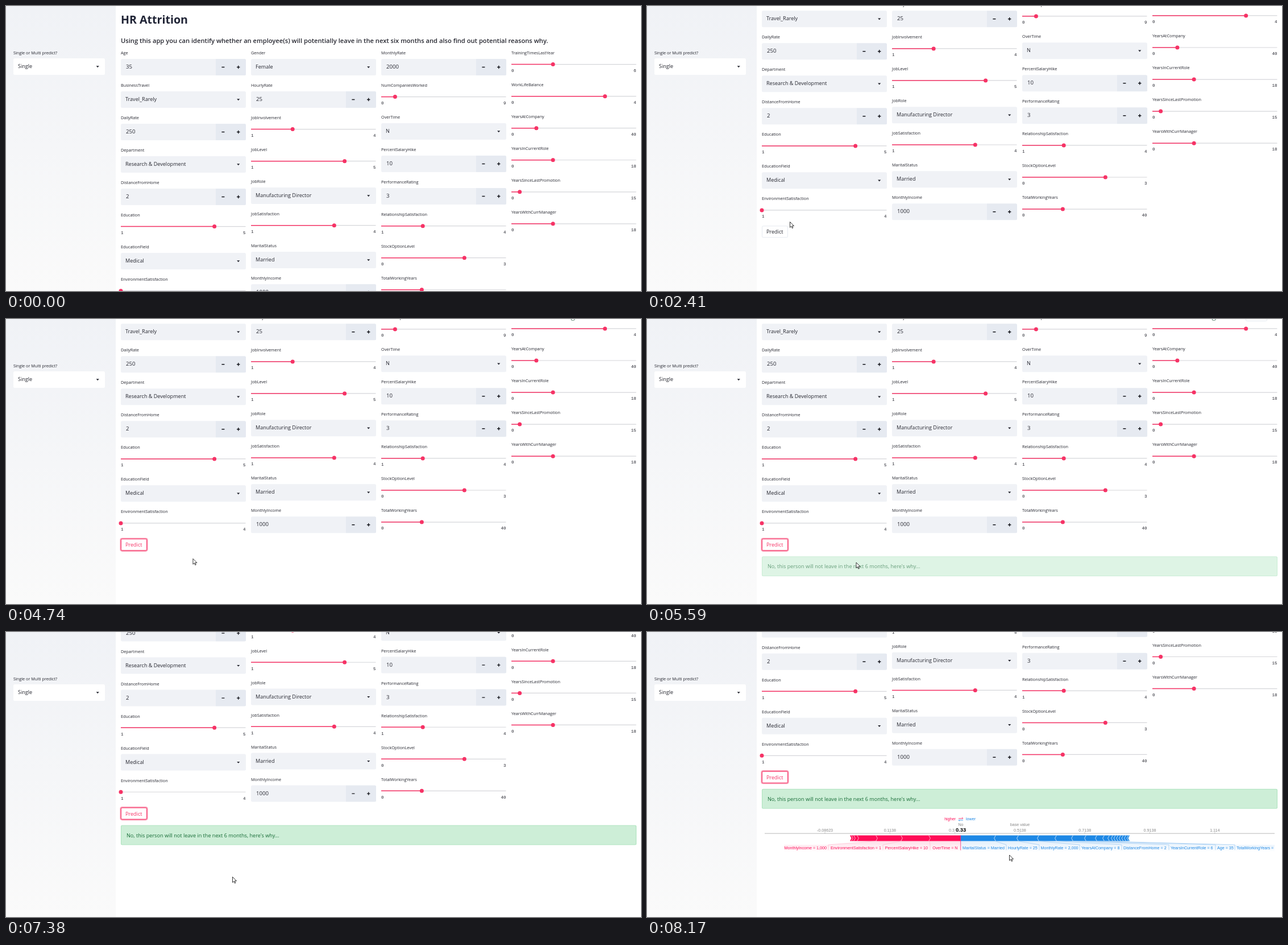
An HTML page that plays this animation: 1117x501 px, repeating every 8570 ms.

```html
<!DOCTYPE html>
<html lang="en">
<head>
<meta charset="utf-8">
<title>HR Attrition</title>
<style>
html, body { margin: 0; width: 100%; height: 100%; overflow: hidden; background: #fff; }
body { position: relative; font: 9.1px/20px "Open Sans", "Noto Sans", sans-serif; color: #262730; }
body div, body svg { position: absolute; white-space: pre; }
svg { overflow: visible; }
#page { left: 0; top: 0; width: 1117px; height: 900px; }
#side { left: 0; top: 0; width: 192.5px; height: 100%; background: linear-gradient(#f0f2f6, #fafafa); }
.title { font-size: 19.6px; font-weight: 700; color: #1f2335; }
.lead { font-size: 11.17px; font-weight: 600; }
.label { font-size: 7.27px; }
.value { font-size: 9.05px; font-weight: 500; }
.num { font-size: 9.6px; font-weight: 500; }
.mono { font: 7.5px/20px "Liberation Mono", "Noto Sans Mono", monospace; }
.box { height: 29px; border-radius: 2.5px; background: #f0f2f6; overflow: hidden; }
.steps { left: 167px; top: 0; width: 53px; height: 29px; background: #e6eaf1; }
#predict { left: 202px; top: 527.5px; width: 45.5px; height: 21.5px; box-sizing: border-box;
  border: 1px solid #e6eaf1; border-radius: 2.5px; background: #fff; text-align: center; line-height: 19.5px; }
#predict.hover, #predict.focus { border-color: #f63366; color: #f63366; }
#predict.focus { box-shadow: 0 0 0 1.6px rgba(246, 51, 102, .5); }
#predict.down { border-color: #f63366; background: #f63366; color: #fff; }
#alert { left: 202px; top: 558.5px; width: 907px; height: 35px; box-sizing: border-box;
  border: 1px solid rgba(9, 171, 59, .17); border-radius: 2.5px; background: rgba(9, 171, 59, .2);
  color: #176c36; padding-left: 9px; line-height: 33px; }
#chart { left: 0; top: 600px; overflow: hidden; font: 7.15px "Liberation Sans", Arial, sans-serif; }
#run { left: 947px; top: -16px; font-size: 14px; color: #6c8f80; }
#stop { left: 1053px; top: -16px; width: 36px; height: 18px; border: 1px solid #e6eaf1; border-radius: 2.5px; }
#cursor { left: 0; top: 0; }
</style>
</head>
<body>
<div id="page">
  <div id="predict">Predict</div>
  <div id="alert">No, this person will not leave in the next 6 months, here's why...</div>
  <svg id="chart" width="1104" height="110"></svg>
</div>
<div id="run">Running...</div>
<div id="stop"></div>
<div id="side"></div>
<svg id="cursor" width="9" height="13">
  <path d="M0 0V9.8L2.3 7.7 3.9 11.2 5.4 10.5 3.8 7.1H7Z" fill="#fff" stroke="#222" stroke-width=".9"/>
</svg>
<script>
const LOOP = 8570, COL = 219.5;
const $ = id => document.getElementById(id);
const page = $('page'), side = $('side');

function add(parent, cls, style, text = '') {
  const el = document.createElement('div');
  el.className = cls;
  for (const k in style) el.style[k] = typeof style[k] === 'number' ? style[k] + 'px' : style[k];
  el.textContent = text;
  return parent.appendChild(el);
}
const write = (parent, cls, x, y, text) => add(parent, cls, { left: x, top: y - 10.4 }, text);
// One full-size layer per parent keeps thin lines at fractional positions.
function draw(parent, shape) {
  parent.insertAdjacentHTML('beforeend', `<svg style="left:0;top:0" width="1" height="1">${shape}</svg>`);
}

function box(parent, x, y, width) {
  return add(parent, 'box', { left: x, top: y - 14.5, width });
}
function select(parent, x, y, text, width = COL) {
  const b = box(parent, x, y, width);
  write(b, 'value', 8, 14.6, text);
  draw(b, `<path d="M${width - 15.4} 13.3h5.2l-2.6 2.9z" fill="#262730"/>`);
  return b;
}
function number(x, y, value) {
  const b = box(page, x, y, COL);
  write(b, 'num', 9, 14.6, value);
  add(b, 'steps', {});
  draw(b, '<path d="M177.4 14.5h5M204 14.5h5.4M206.7 11.8v5.4" stroke="#16171d" stroke-width="1.4"/>');
}
function slider(x, y, value, min, max) {
  const w = (value - min) / (max - min) * COL;
  draw(page, `<path d="M${x} ${y}h${COL}" stroke="#d5d6da" stroke-width="1.2"/>` +
    `<path d="M${x} ${y}h${w}" stroke="#f63366" stroke-width="1.5"/>` +
    `<circle cx="${x + w}" cy="${y}" r="3.5" fill="#f63366"/>`);
  write(page, 'mono', x, y + 11.9, min);
  add(page, 'mono', { right: 1117 - x - COL, top: y + 1.5 }, max);
}

// A string is a select, a number an input, an array a slider [value, min, max].
const columns = [
  [['Age', 35], ['BusinessTravel', 'Travel_Rarely'], ['DailyRate', 250],
   ['Department', 'Research & Development'], ['DistanceFromHome', 2], ['Education', [4, 1, 5]],
   ['EducationField', 'Medical'], ['EnvironmentSatisfaction', [1, 1, 4]]],
  [['Gender', 'Female'], ['HourlyRate', 25], ['JobInvolvement', [2, 1, 4]], ['JobLevel', [4, 1, 5]],
   ['JobRole', 'Manufacturing Director'], ['JobSatisfaction', [3, 1, 4]],
   ['MaritalStatus', 'Married'], ['MonthlyIncome', 1000]],
  [['MonthlyRate', 2000], ['NumCompaniesWorked', [1, 0, 9]], ['OverTime', 'N'],
   ['PercentSalaryHike', 10], ['PerformanceRating', 3], ['RelationshipSatisfaction', [2, 1, 4]],
   ['StockOptionLevel', [2, 0, 3]], ['TotalWorkingYears', [13, 0, 40]]],
  [['TrainingTimesLastYear', [2, 0, 6]], ['WorkLifeBalance', [3, 0, 4]], ['YearsAtCompany', [8, 0, 40]],
   ['YearsInCurrentRole', [6, 0, 18]], ['YearsSinceLastPromotion', [1, 0, 15]],
   ['YearsWithCurrManager', [6, 0, 18]]]
];

write(page, 'title', 202, 23.9, 'HR Attrition');
write(page, 'lead', 202, 61, 'Using this app you can identify whether an employee(s) will potentially leave ' +
  'in the next six months and also find out potential reasons why.');
columns.forEach((fields, i) => {
  const x = 202 + i * 229;
  let y = 82.3;
  for (const [name, v] of fields) {
    write(page, 'label', x, y, name);
    if (Array.isArray(v)) {
      slider(x, y + 20.3, ...v);
      y += 56.05;
    } else {
      if (typeof v === 'number') number(x, y + 24.7, v);
      else select(page, x, y + 24.7, v);
      y += 57;
    }
  }
});
write(side, 'label', 13, 82.2, 'Single or Multi predict?');
select(side, 13, 106.5, 'Single', 161).style.background = '#fff';

function drawChart() {
  const pink = '#ff0d57', blue = '#1e88e5', palePink = '#ffc3d5', paleBlue = '#a5cdf3';
  const top = 40.8, low = 50.8, mid = 45.8;
  const out = [];
  const text = (x, y, s, fill, anchor = 'middle', extra = '') =>
    out.push(`<text x="${x}" y="${y}" fill="${fill}" text-anchor="${anchor}" ${extra}>${s}</text>`);
  const path = (d, stroke, w = .8, fill = 'none') =>
    out.push(`<path d="${d}" stroke="${stroke}" stroke-width="${w}" fill="${fill}"/>`);
  const fade = (id, c) => out.push(`<linearGradient id="${id}" x2="0" y2="1"><stop stop-color="${c}" ` +
    `stop-opacity=".13"/><stop offset="1" stop-color="${c}" stop-opacity="0"/></linearGradient>`);

  fade('gp', pink);
  fade('gb', blue);
  path('M404 50.8L319 57.5H241V70H551.5V50.8Z', 'none', 0, 'url(#gp)');
  path('M551.5 50.8V70H1104V57.5H1034L790 50.8Z', 'none', 0, 'url(#gb)');

  text(543, 14.8, 'higher', pink, 'end');
  text(561, 14.8, 'lower', blue, 'start');
  path('M548 11.2H556M554 9.4L556 11.2', pink);
  path('M556 14H548M550 15.8L548 14', blue);
  text(552, 24.2, 'No', '#888');
  text(656, 24.2, 'base value', '#888');
  path('M207 37.4H1104', '#999', .7);
  ['-0.08623', '0.1138', '', '0.5138', '0.7138', '0.9138', '1.114'].forEach((s, i) => {
    const x = 313 + i * 114.3;
    path(`M${x} 35.5V37.4`, '#999', .6);
    text(x, 34.2, s, '#888');
  });
  text(541, 34.2, '0.3', '#888', 'end');
  text(552, 34.6, '0.33', '#000', 'middle', 'font-size="9.4" font-weight="700"');

  path(`M357 ${top}H551.5V${low}H357L359.5 ${mid}Z`, 'none', 0, pink);
  path(`M551.5 ${top}H849L846.5 ${mid}L849 ${low}H551.5Z`, 'none', 0, blue);
  const notch = (x, dir, c) => path(`M${x - dir} ${top}L${x + dir} ${mid}L${x - dir} ${low}`, c, .9);
  [361, 365, 371, 404, 448, 497].forEach(x => notch(x, 1.4, '#ffc3d5'));
  [612, 652, 688, 719, 748, 771, 790, 803, 812].forEach(x => notch(x, -1.4, '#d1e6fa'));
  for (let x = 818; x < 848; x += 4.6) notch(x, -1.4, '#d1e6fa');

  const leader = (from, to, c) => path(`M${from} ${low}L${to} 57.3V66.5`, c, .8);
  [[404, 319], [448, 415], [497, 498]].forEach(p => leader(...p, palePink));
  [[612, 632], [652, 690], [688, 761], [719, 835], [748, 918], [771, 1000], [790, 1034]]
    .forEach(p => leader(...p, paleBlue));
  path(`M551.7 ${top}V67`, pink, .7);

  [[316, 'MonthlyIncome = 1,000'], [412, 'EnvironmentSatisfaction = 1'],
   [494, 'PercentSalaryHike = 10'], [546.5, 'OverTime = N']].forEach(([x, s]) => text(x, 65.6, s, pink, 'end'));
  [[555, 'MaritalStatus = Married'], [635, 'HourlyRate = 25'], [692.5, 'MonthlyRate = 2,000'],
   [764, 'YearsAtCompany = 8'], [838, 'DistanceFromHome = 2'], [921, 'YearsInCurrentRole = 6'],
   [1003, 'Age = 35'], [1037, 'TotalWorkingYears = 13']].forEach(([x, s]) => text(x, 65.6, s, blue, 'start'));
  $('chart').innerHTML = out.join('');
}
drawChart();

const scroll = [[1020, 0], [1070, 18], [1160, 74.3], [1230, 74.3], [1330, 120], [1420, 141.7],
  [7240, 141.7], [7380, 219.4], [7440, 219.4], [7560, 283.3]];
const pointer = [[410, 1088, 488], [560, 960, 330], [740, 804, 165], [1340, 804, 165], [1640, 764, 248],
  [1950, 764, 248], [2150, 520, 320], [2410, 251.5, 379.5], [2440, 251.5, 379.5], [2720, 236, 397],
  [3570, 236, 397], [3610, 249.5, 400], [3660, 249.5, 400], [4440, 312, 418], [5330, 362, 428],
  [5590, 368, 428], [6230, 368, 427], [6420, 340, 424], [6650, 385, 425], [6800, 385, 425],
  [6980, 398.5, 430.5], [8040, 398.5, 430.5], [8165, 637.5, 392]];
const alertFade = [[5430, 0], [5590, .65], [5640, .65], [5800, 1]];

// Linear value of a track of [time, ...values] at time t.
function at(track, t) {
  const i = track.findIndex(k => k[0] > t);
  if (i < 0) return track[track.length - 1].slice(1);
  if (i === 0) return track[0].slice(1);
  const a = track[i - 1], b = track[i], p = (t - a[0]) / (b[0] - a[0]);
  return a.slice(1).map((v, j) => v + (b[j + 1] - v) * p);
}
const show = (id, on) => $(id).style.visibility = on ? 'visible' : 'hidden';

const start = performance.now();
function frame(now) {
  const t = Math.max(0, now - start) % LOOP;
  page.style.transform = `translateY(${-at(scroll, t)[0]}px)`;
  const [x, y] = at(pointer, t);
  $('cursor').style.transform = `translate(${x}px, ${y}px)`;
  show('cursor', t >= 410);
  $('predict').className = t < 2600 ? '' : t < 3100 ? 'hover' : t < 3200 ? 'down' : 'focus';
  $('alert').style.opacity = at(alertFade, t)[0];
  show('chart', t >= 7560);
  show('run', t >= 3700 && t < 6900);
  show('stop', t >= 5370 && t < 6900);
  requestAnimationFrame(frame);
}
frame(start);
</script>
</body>
</html>
```
